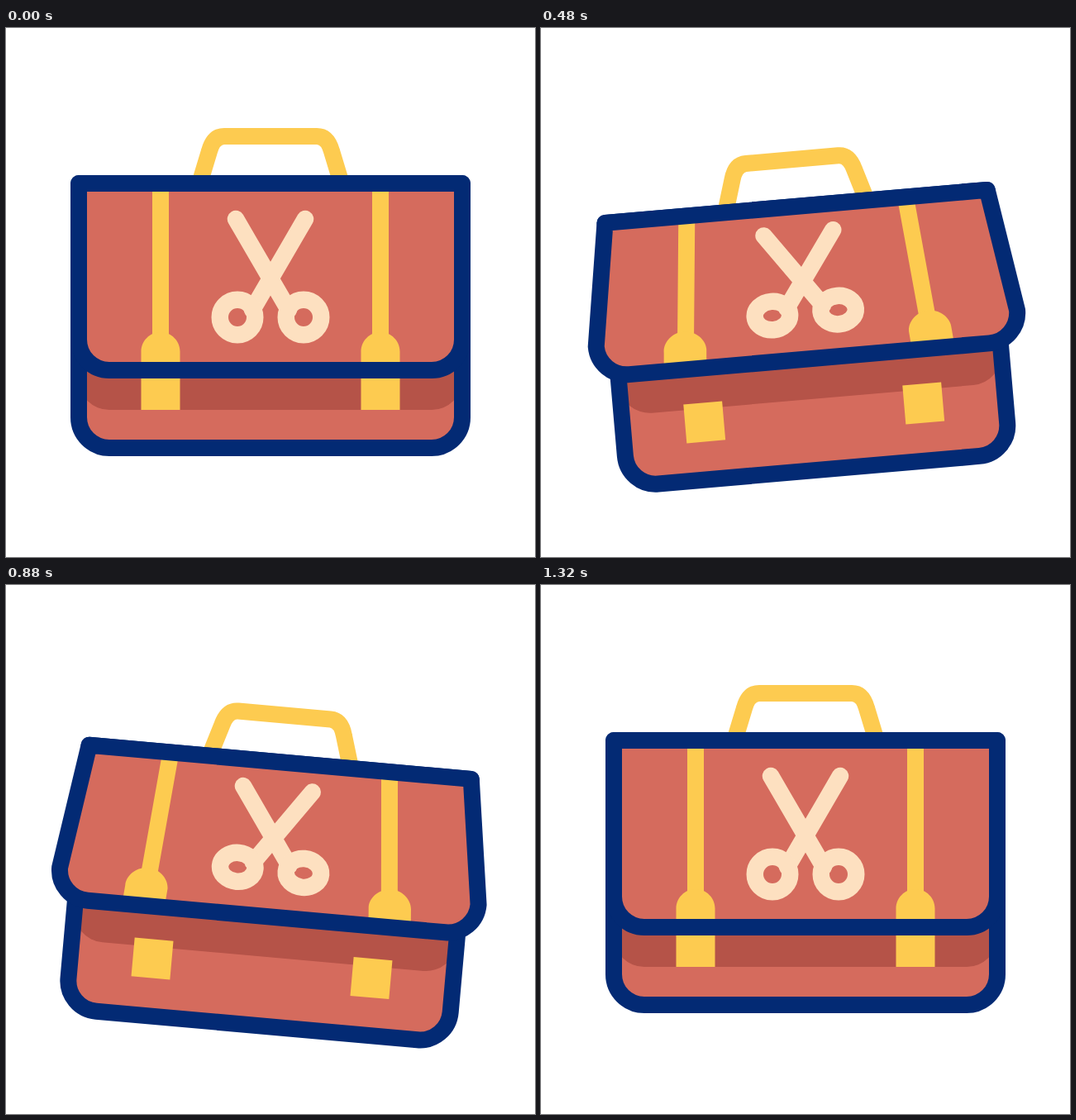
An HTML page that plays this animation: 640 by 640 pixels, repeating every 1.4 s.

```html
<!DOCTYPE html>
<html lang="en">
<head>
<meta charset="utf-8">
<title>Briefcase</title>
<style>
  html, body { margin: 0; width: 100%; height: 100%; overflow: hidden; background: #fff; }
  svg { display: block; width: 100vw; height: 100vh; }
  .line { fill: none; stroke-width: 20; stroke-linejoin: round; }
  .navy { stroke: #032a74; }
  .gold { stroke: #fdcb50; }
  .cream { stroke: #fde0c0; stroke-width: 20.5; stroke-linecap: round; }
  .red { fill: #d56b5d; }
  .shade { fill: #b55348; }
  .brass { fill: #fdcb50; }
</style>
</head>
<body>
<svg viewBox="0 0 640 640">
  <defs>
    <clipPath id="inside"><path d="M88 188H552V471Q552 508 515 508H125Q88 508 88 471Z"/></clipPath>
  </defs>
  <g id="bag">
    <path class="line gold" d="M236 182L246 149Q251 131 264 131H376Q389 131 394 149L404 182"/>
    <path class="red" d="M88 188H552V471A37 37 0 0 1 515 508H125A37 37 0 0 1 88 471Z"/>
    <g clip-path="url(#inside)">
      <path id="shadow" class="shade" d="M88 360H552V425A37 37 0 0 1 515 462H125A37 37 0 0 1 88 425Z"/>
    </g>
    <path class="brass" d="M163.5 415h47v47h-47zM429.5 415h47v47h-47z"/>
    <path class="line navy" d="M88 188H552V471A37 37 0 0 1 515 508H125A37 37 0 0 1 88 471Z"/>
    <path id="flap" class="red"/>
    <path id="straps" class="line gold"/>
    <path id="buckles" class="brass"/>
    <path id="blades" class="line cream"/>
    <ellipse class="line cream loop" cx="280" rx="21.25"/>
    <ellipse class="line cream loop" cx="360" rx="21.25"/>
    <path id="rim" class="line navy"/>
  </g>
</svg>
<script>
  const LOOP = 1400, STEP = 40;
  const TILT = [[100, 0], [440, -5.2], [868, 5.1], [1320, 0]];
  const LIFT = [[125, 0], [630, 1], [680, 1], [1280, 0]];

  const $ = id => document.getElementById(id);
  const loops = document.querySelectorAll('.loop');
  const ease = x => x * x * (3 - 2 * x);

  function track(keys, t) {
    if (t <= keys[0][0]) return keys[0][1];
    for (let i = 1; i < keys.length; i++) {
      const [t0, a] = keys[i - 1], [t1, b] = keys[i];
      if (t < t1) return a + (b - a) * ease((t - t0) / (t1 - t0));
    }
    return keys[keys.length - 1][1];
  }

  // The lower edge of the flap rises and spreads as it swings open.
  function flapPath(p) {
    const l = 88 - 30 * p, r = 552 + 30 * p, y = 414 - 52 * p;
    return `M88 188H552L${r} ${y - 37}A37 37 0 0 1 ${r - 37} ${y}H${l + 37}A37 37 0 0 1 ${l} ${y - 37}Z`;
  }

  function strapPath(p, side) {
    return `M${320 + side * 133} 190L${320 + side * (133 + 17.5 * p)} ${376 - 52 * p}`;
  }

  function bucklePath(p, side) {
    const x = d => 320 + side * d, up = 52 * p;
    const outer = 156.5 + 23 * p, inner = 109.5 + 17 * p, mid = (outer + inner) / 2;
    const top = 368 - up, shoulder = 391.5 - up, k = 13;
    return `M${x(156.5 + 25.5 * p)} ${414 - up}L${x(outer)} ${shoulder}` +
      `C${x(outer)} ${shoulder - k} ${x(mid + k)} ${top} ${x(mid)} ${top}` +
      `S${x(inner)} ${shoulder - k} ${x(inner)} ${shoulder}` +
      `L${x(109.5 + 19.5 * p)} ${414 - up}Z`;
  }

  const both = (path, p) => path(p, -1) + path(p, 1);

  function draw(ms) {
    const t = Math.floor((ms % LOOP) / STEP) * STEP;
    const p = track(LIFT, t);
    const squash = y => 171 + (y - 171) * (1 - 0.233 * p);

    $('bag').setAttribute('transform', `translate(0 ${34.8 * p}) rotate(${track(TILT, t)} 320 320)`);
    $('shadow').setAttribute('transform', `translate(0 ${-51 * p})`);
    $('flap').setAttribute('d', flapPath(p));
    $('rim').setAttribute('d', flapPath(p));
    $('straps').setAttribute('d', both(strapPath, p));
    $('buckles').setAttribute('d', both(bucklePath, p));
    $('blades').setAttribute('d',
      `M278 ${squash(231)}L342 ${squash(341)}M362 ${squash(231)}L298 ${squash(341)}`);
    for (const loop of loops) {
      loop.setAttribute('cy', squash(350));
      loop.setAttribute('ry', 21.25 * (1 - 0.24 * p));
    }
  }

  const start = performance.now();
  function tick() {
    draw(performance.now() - start);
    requestAnimationFrame(tick);
  }
  tick();
</script>
</body>
</html>
```
